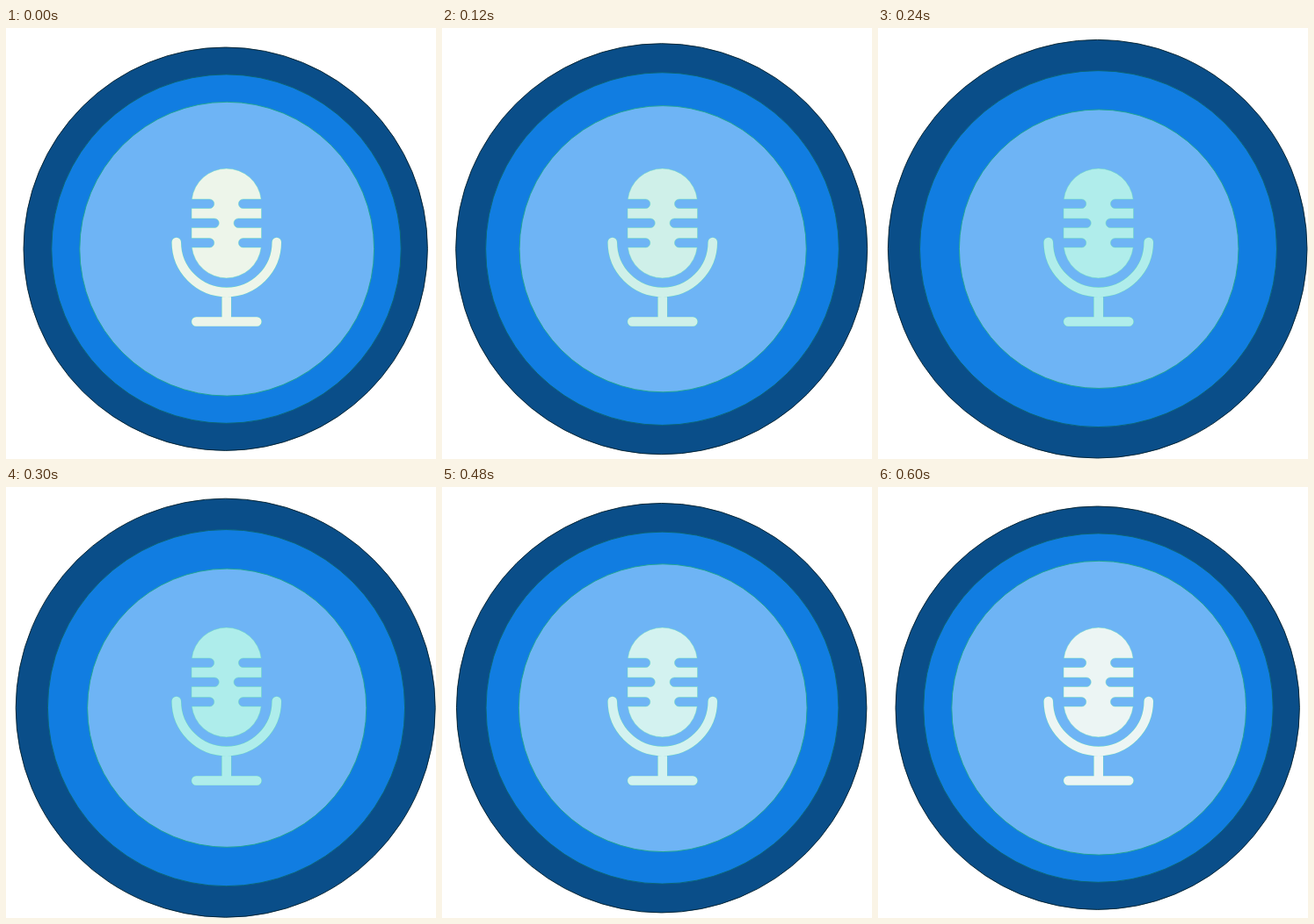
These frames come from a looping animation (489x491 px, 0.63 s). An HTML page:

```html
<!DOCTYPE html>
<html lang="en">
<head>
<meta charset="utf-8">
<title>Microphone button</title>
<style>
  html, body { margin: 0; width: 100%; height: 100%; overflow: hidden; background: #fff; }
  svg { display: block; width: 489px; height: 491px; }
  .stand { fill: none; stroke-linecap: round; }
  .rim { stroke: #67d9bd; stroke-width: 11.2; }
  .fill { stroke: currentColor; stroke-width: 10.4; }
  .body { fill: currentColor; stroke: #67d9bd; stroke-width: .5; }
</style>
</head>
<body>
<svg viewBox="0 0 489 491">
  <defs>
    <path id="stand" d="M193.8 244a57 57 0 0 0 114 0M250.8 301V334.5M216.3 334.5H285.3"/>
  </defs>
  <circle id="outer" cx="249.7" cy="251.7" fill="#0a4e89" stroke="#03202c" stroke-width=".9"/>
  <circle id="middle" cx="250.5" cy="251.6" fill="#117de1" stroke="#0b6670" stroke-width=".9"/>
  <circle id="inner" cx="251.2" cy="251.7" fill="#6eb4f5" stroke="#1fa68c" stroke-width=".9"/>
  <g id="mic">
    <path class="body" d="M211.3 195A39.75 39.75 0 0 1 290.2 195
      H269.7a5.25 5.25 0 0 0 0 10.5H290.5V217
      H264.3a5.25 5.25 0 0 0 0 10.5H290.5V239.5
      H269.7a5.25 5.25 0 0 0 0 10.5H290.2
      A39.75 39.75 0 0 1 211.3 250
      H231.5a5.25 5.25 0 0 0 0 -10.5H211V227.5
      H237a5.25 5.25 0 0 0 0 -10.5H211V205.5
      H231.5a5.25 5.25 0 0 0 0 -10.5Z"/>
    <use href="#stand" class="stand rim"/>
    <use href="#stand" class="stand fill"/>
  </g>
</svg>
<script>
  const STEP = 30, LOOP = 630, PEAK = 270, END = 600;
  const $ = id => document.getElementById(id);
  const rings = [
    [$('outer'), 229.7, 9.7],
    [$('middle'), 198.7, 4.8],
    [$('inner'), 167.4, -9.7]
  ];
  const tints = [
    [0, 237, 245, 234],
    [60, 221, 242, 228],
    [180, 192, 238, 238],
    [PEAK, 168, 236, 234],
    [END, 236, 245, 244]
  ];

  function tint(t) {
    const i = Math.max(1, tints.findIndex(k => k[0] >= t));
    const a = tints[i - 1], b = tints[i];
    const p = (t - a[0]) / (b[0] - a[0]);
    const rgb = [1, 2, 3].map(c => Math.round(a[c] + (b[c] - a[c]) * p));
    return `rgb(${rgb})`;
  }

  function draw(now) {
    const t = Math.floor((now % LOOP) / STEP) * STEP;
    const pulse = t < PEAK ? t / PEAK : (END - t) / (END - PEAK);
    for (const [el, r, grow] of rings) el.setAttribute('r', r + grow * pulse);
    $('mic').style.color = tint(t);
  }

  const start = performance.now();
  function tick() {
    draw(performance.now() - start);
    requestAnimationFrame(tick);
  }
  tick();
</script>
</body>
</html>
```
